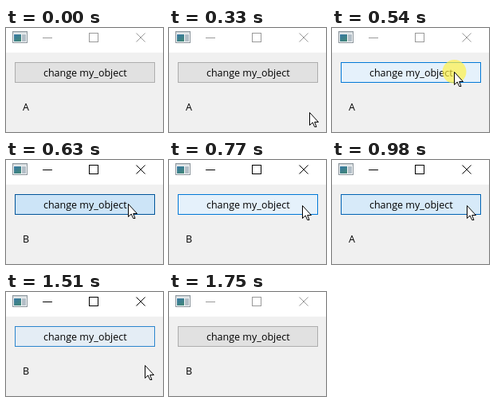
Recreate the animation shown at these times as an HTML page with a canvas. Size 197 px wide and 131 px high, loop 1780 ms.

```html
<!DOCTYPE html>
<html lang="en">
<head>
<meta charset="utf-8">
<title>Toggle button</title>
<style>
  html, body { margin: 0; width: 100%; height: 100%; overflow: hidden; background: #f0f0f0; }
  canvas { display: block; width: 100vw; height: 100vh; }
</style>
</head>
<body>
<canvas id="stage" width="197" height="131"></canvas>
<script>
const ctx = document.getElementById('stage').getContext('2d');
const LOOP = 1780, TICK = 30, FADE = 140;

// The picture advances in ticks counted from these moments.
const tickStarts = [0, 770, 870, 980, 1450];

const clicks = [
  { press: 540, release: 630 },
  { press: 870, release: 920 },
  { press: 1190, release: 1230 },
];

// Pointer tip: time, x, y
const path = [
  [330, 176, 106], [360, 173, 95], [450, 157, 63], [510, 153, 55], [630, 153, 55],
  [740, 167, 57], [840, 167, 57], [900, 169, 57], [1190, 169, 57], [1290, 165, 57],
  [1440, 165, 57], [1480, 169, 72], [1540, 179, 112], [1570, 185, 135],
];

const normal = { fill: [225, 225, 225], border: [173, 173, 173] };
const hover = { fill: [229, 241, 251], border: [0, 120, 215] };
const pressed = { fill: [204, 228, 247], border: [0, 84, 153] };

const clamp = v => Math.max(0, Math.min(1, v));
const progress = (t, from, to) => clamp((t - from) / (to - from));
const lerp = (a, b, k) => a + (b - a) * k;
const mix = (a, b, k) => a.map((v, i) => lerp(v, b[i], k));
const blend = (a, b, k) => ({ fill: mix(a.fill, b.fill, k), border: mix(a.border, b.border, k) });
const rgb = c => `rgb(${c.map(Math.round)})`;

function snap(t) {
  const start = tickStarts.filter(s => s <= t).pop();
  return start + Math.floor((t - start) / TICK) * TICK;
}

function pointerAt(t) {
  const next = path.findIndex(p => p[0] > t);
  if (next < 1) return null;
  const a = path[next - 1], b = path[next], k = progress(t, a[0], b[0]);
  return [1, 2].map(i => Math.round(lerp(a[i], b[i], k)));
}

function buttonAt(t) {
  const over = progress(t, 450, 540) - progress(t, 1480, 1600);
  const down = Math.max(...clicks.map(({ press, release }) =>
    t < release ? progress(t, press, press + 30) : 1 - progress(t, release, release + FADE)));
  return blend(blend(normal, hover, over), pressed, down);
}

function rect(x, y, w, h, color) {
  ctx.fillStyle = color;
  ctx.fillRect(x, y, w, h);
}

function line(color, ...points) {
  ctx.strokeStyle = color;
  ctx.lineWidth = 1;
  ctx.beginPath();
  points.forEach(([x, y], i) => i ? ctx.lineTo(x, y) : ctx.moveTo(x, y));
  ctx.stroke();
}

function text(string, x, y) {
  ctx.font = '12.5px "Open Sans", "Noto Sans", sans-serif';
  ctx.fillStyle = '#000';
  ctx.fillText(string, x, y);
}

function drawTitleBar(active) {
  const color = active ? '#000' : '#999';
  rect(0, 0, 197, 31, '#fff');

  rect(8, 4, 19, 15, '#8b949b');
  rect(9, 5, 17, 2, '#d4dadd');
  rect(9, 7, 17, 11, '#f5f7f8');
  const pane = ctx.createLinearGradient(10, 7, 17, 18);
  pane.addColorStop(0, '#3878a8');
  pane.addColorStop(1, '#428775');
  rect(10, 8, 9, 9, pane);
  rect(20, 8, 5, 9, '#b3bfc7');

  line(color, [46, 12.5], [58, 12.5]);
  ctx.strokeRect(104.5, 6.5, 11, 11);
  line(color, [163.5, 6.5], [174.5, 17.5]);
  line(color, [174.5, 6.5], [163.5, 17.5]);
}

function drawButton({ fill, border }) {
  rect(11, 43, 176, 26, rgb(border));
  rect(12, 44, 174, 24, rgb(fill));
  text('change my_object', 47, 61);
}

function drawHalo([x, y]) {
  ctx.fillStyle = 'rgba(255, 240, 65, 0.68)';
  ctx.beginPath();
  ctx.arc(x + 0.5, y, 15, 0, Math.PI * 2);
  ctx.fill();
}

function drawPointer([x, y]) {
  ctx.save();
  ctx.translate(x + 0.5, y + 0.5);
  const arrow = new Path2D('M0 0V16L3.7 12.5L6.2 18H8.5L6.2 12H11Z');
  ctx.fillStyle = '#fff';
  ctx.fill(arrow);
  ctx.strokeStyle = '#000';
  ctx.lineWidth = 1;
  ctx.stroke(arrow);
  ctx.restore();
}

function draw(t) {
  rect(0, 0, 197, 131, '#f0f0f0');
  drawTitleBar(t >= 570 && t < 1750);
  drawButton(buttonAt(t));
  const toggles = clicks.filter(c => t >= c.release).length;
  text('AB'[toggles % 2], 21, 104);

  const pointer = pointerAt(t);
  if (!pointer) return;
  if (clicks.some(c => t >= c.press && t < c.release)) drawHalo(pointer);
  drawPointer(pointer);
}

const begin = performance.now();
function frame() {
  draw(snap((performance.now() - begin) % LOOP));
  requestAnimationFrame(frame);
}
frame();
</script>
</body>
</html>
```
